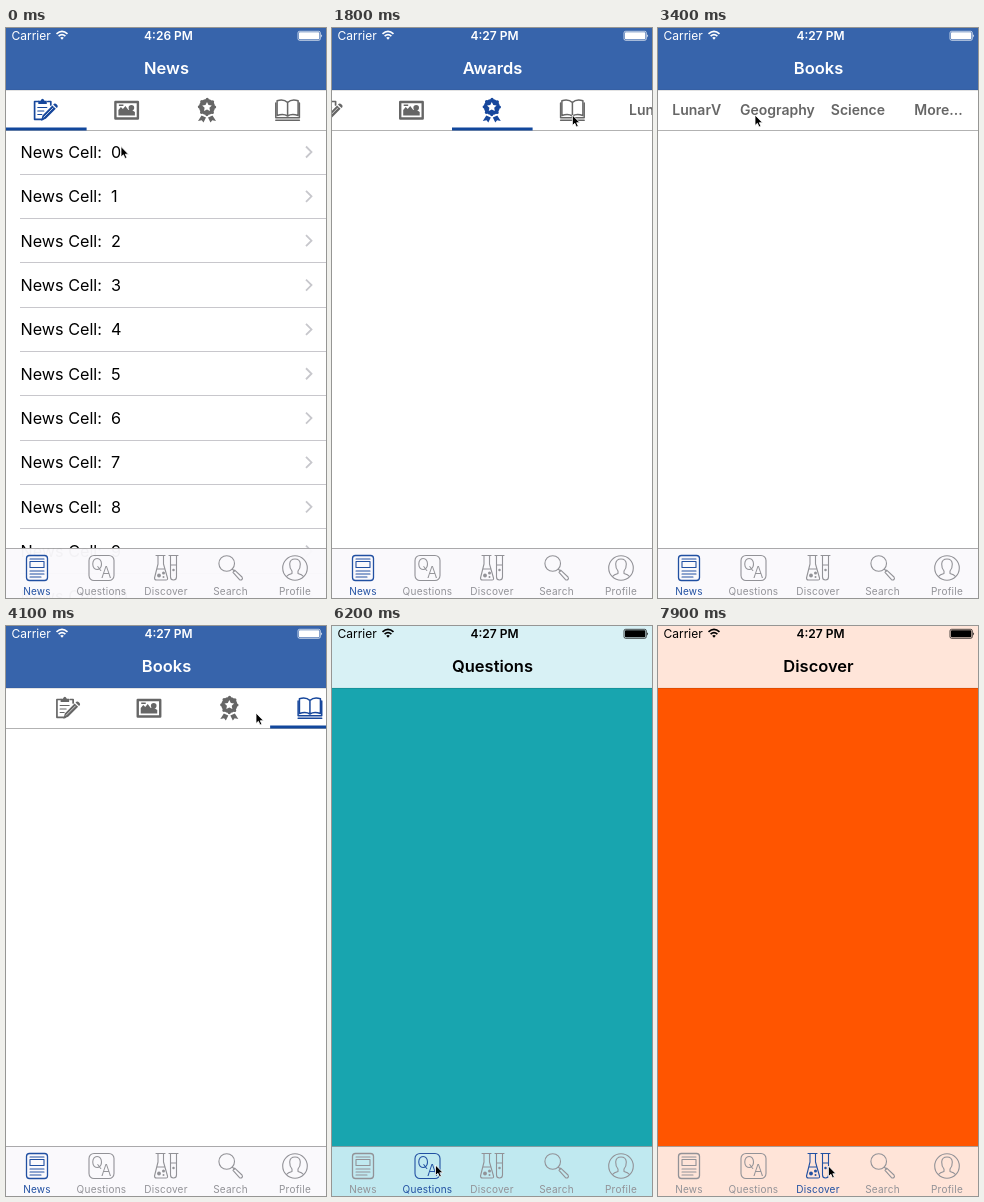
These frames come from a looping animation (320x570 px, 8000 ms). An HTML page:

```html
<!DOCTYPE html>
<html lang="en">
<head>
<meta charset="utf-8">
<title>Tabbed app</title>
<style>
html, body { margin: 0; width: 100%; height: 100%; overflow: hidden; background: #fff; }
svg { display: block; width: 320px; height: 570px; font-family: Inter, Roboto, "Liberation Sans", sans-serif; }
.icon { fill: none; stroke: currentColor; stroke-linejoin: round; stroke-linecap: round; }
.solid { fill: currentColor; stroke: none; }
.mid { text-anchor: middle; }
#strip text { font-size: 14px; font-weight: 600; fill: currentColor; }
#tabs text { font-size: 10px; font-weight: 400; letter-spacing: .25px; fill: currentColor; }
#tabs .icon { stroke-width: 1.1; }
#tabs .letter { font-size: 15.5px; font-weight: 300; letter-spacing: 0; stroke: none; }
</style>
</head>
<body>
<svg viewBox="0 0 320 570">
  <defs>
    <clipPath id="stage"><path d="M0 0H320V570H0Z"/></clipPath>
  </defs>
  <g clip-path="url(#stage)">
    <rect width="320" height="570" fill="#fff"/>
    <g id="pager">
      <g id="news"></g>
      <g id="photos"><rect x="320" y="102" width="320" height="468" fill="#efeff4"/></g>
    </g>
    <g id="strip">
      <rect y="62" width="320" height="40" fill="#fff"/>
      <path d="M0 102.5H320" stroke="#b2b2b2"/>
      <g id="items"><rect id="mark" y="99.5" width="80.6" height="3" fill="#11479c"/></g>
    </g>
    <rect id="fill" y="62" width="320" height="458"/>
    <rect id="nav" width="320" height="62"/>
    <path d="M0 62.25H320" stroke="#000" stroke-opacity=".3" stroke-width=".5"/>
    <g id="status" fill="currentColor">
      <text x="5.5" y="12" font-size="12">Carrier</text>
      <g fill="none" stroke="currentColor" stroke-width="1.7">
        <path d="M50.5 5.8Q56 .9 61.5 5.8M52.6 8.1Q56 5.1 59.4 8.1"/>
        <path d="M56 11.8L54.2 9.8Q56 8.4 57.8 9.8Z" fill="currentColor" stroke="none"/>
      </g>
      <text id="clock" class="mid" x="162.5" y="12" font-size="12" font-weight="600"></text>
      <rect x="292" y="3.3" width="22.3" height="9" rx="1.6" fill="none" stroke="currentColor" stroke-width=".7"/>
      <rect x="293" y="4.3" width="20.3" height="7" rx=".8"/>
      <path d="M315.2 6.2Q317 7.8 315.2 9.4Z"/>
      <text id="title" class="mid" x="160.5" y="45.8" font-size="16.5" font-weight="600"></text>
    </g>
    <g id="tabs">
      <rect id="bar" y="520" width="320" height="50"/>
      <path d="M0 520.5H320" stroke="#000" stroke-opacity=".32"/>
    </g>
    <path id="cursor" d="M0 0V10.5L2.4 8.3 4 12 5.9 11.2 4.3 7.7H7.5Z" stroke="#fff" stroke-width=".8"/>
  </g>
</svg>
<script>
const el = id => document.getElementById(id);
const add = (id, markup) => el(id).insertAdjacentHTML('beforeend', markup);
const STEP = 80.6, STRIP_BLUE = '#17479c', TAB_BLUE = '#2150a2';

const stripIcons = [
  // clipboard with pencil
  `<path stroke-width="1.7" d="M-7 -8.5H-11.2V9.3H-3M2 -8.5H5V-5"/>
   <path class="solid" d="M-7.5 -6V-9.3H-5.3Q-3.3 -13 -1.3 -9.3H1V-6Z"/>
   <path stroke-width="1.2" d="M-8 -2.5H1M-8 1H-2M-8 4.5H-4"/>
   <path class="solid" d="M6.5 -4.5L10 -1.2L0 8.8L-4.8 10.8L-3.3 5.5Z M7.4 -5.5Q9 -7.6 11 -5.6Q13 -3.8 10.9 -2.1Z"/>
   <path stroke="#fff" stroke-width=".7" d="M7.2 -2L-2 7.2"/>`,
  // framed picture
  `<rect x="-11" y="-8" width="22.5" height="16.5" stroke-width="2.4"/>
   <path class="solid" d="M-8 5.5V0L-5.5 -3 -3.5 -1 -1 -4 2 0 4 -1 8.5 2V5.5Z"/>
   <circle class="solid" cx="5" cy="-2.2" r="2.8"/>
   <path class="solid" d="M-7.5 -5.5H-3V-4H-7.5Z"/>`,
  // rosette
  `<circle class="solid" cy="-3" r="8"/>
   <circle cy="-3" r="7.6" stroke-width="3.2" stroke-dasharray="0 5.97"/>
   <path fill="#fff" stroke="none" d="M0 -8L1.5 -5 4.8 -4.6 2.4 -2.2 3 1.1 0 -.5 -3 1.1 -2.4 -2.2 -4.8 -4.6 -1.5 -5Z"/>
   <path class="solid" d="M-5.5 5.5L-1 7.5-3.5 12.5-5.3 10.2-9 11Z M5.5 5.5L1 7.5 3.5 12.5 5.3 10.2 9 11Z"/>`,
  // open book
  `<path stroke-width="1.5" d="M0 6V-7.5Q-4 -11.5 -10.5 -9.3V5.5Q-4 3.5 0 6Q4 3.5 10.5 5.5V-9.3Q4 -11.5 0 -7.5"/>
   <path stroke-width="1.5" d="M-11.8 -7V7.8H11.8V-7M-11.8 10.3H11.8"/>`
];
const topics = ['LunarV', 'Geography', 'Science', 'More...'];

const tabIcons = [
  `<rect x="-10.5" y="-12.5" width="21" height="25" rx="3" stroke-width="1.3"/>
   <path d="M-7 -9H7M-7 3H7M-7 6H7M-7 9H4"/><rect x="-7" y="-6.5" width="14" height="6"/>`,
  `<rect x="-12.5" y="-12.5" width="25" height="25" rx="5"/>
   <text class="letter mid" x="-4.5" y="1.5">Q</text><text class="letter mid" x="4.8" y="9.8">A</text>`,
  `<path d="M-10 -12.5H-1M-8 -12.5V-4L-11.5 10Q-11.5 12 -9.5 12H0Q2 12 1.5 10L-2.5 -4V-12.5M-9 1H-1"/>
   <path d="M3 -12.5H12M4.5 -12.5V9Q4.5 12 7.5 12T10.5 9V-12.5M4.5 -3H10.5"/>
   <circle class="solid" cx="-7" cy="7.5" r="1.9"/><circle class="solid" cx="-2.5" cy="5" r="1.5"/>
   <circle class="solid" cx="-2.5" cy="9" r="1"/><circle cx="7.5" cy="2" r=".7"/>`,
  `<circle cx="-3.8" cy="-4.5" r="7.8"/>
   <path d="M1.7 1L4 3.2M4.2 2.2L11.5 9Q12.5 10.5 11.5 11.5T9 11.7L2.5 4.3Z"/>`,
  `<circle r="12.3"/>
   <path d="M-8.5 8.5Q-7 6.5 -3 5.5V3Q-5.5 0 -5.3 -4Q-5 -9 0 -9T5.3 -4Q5.5 0 3 3V5.5Q7 6.5 8.5 8.5"/>`
];
const tabNames = ['News', 'Questions', 'Discover', 'Search', 'Profile'];

for (let i = 0; i < 11; i++) {
  const y = 124 + 44.35 * i;
  add('news', `<text x="14.5" y="${y + 6}" font-size="16.2" xml:space="preserve">News Cell:  ${i}</text>
    <path d="M14 ${Math.floor(y + 22) + .5}H320" stroke="#c8c7cc"/>
    <path d="M300 ${y - 5.5}l5.5 5.5l-5.5 5.5" fill="none" stroke="#c7c7cc" stroke-width="1.8"/>`);
}
for (let i = 0; i < 6; i++)
  add('photos', `<rect x="${329 + i % 2 * 157}" y="${112 + (i >> 1) * 156.5}" width="146" height="146.5" fill="#fff"/>`);

stripIcons.forEach((icon, i) =>
  add('items', `<g id="item${i}" class="icon" transform="translate(${STEP * (i + .5) - .5} 82)">${icon}</g>`));
topics.forEach((name, i) =>
  add('items', `<text class="mid" color="#666" x="${STEP * (i + 4.5)}" y="87">${name}</text>`));
tabNames.forEach((name, i) => {
  const x = 31 + 64.5 * i;
  add('tabs', `<g id="tab${i}"><g class="icon" transform="translate(${x} 540)">${tabIcons[i]}</g>
    <text class="mid" x="${x}" y="566.5">${name}</text></g>`);
});

// Each key is [time, ...values]; eased between neighbours.
const pageKeys = [[600, 0], [900, 1], [1400, 1], [1700, 2], [2000, 2], [2300, 3]];
const scrollKeys = [[1400, 0], [1700, 41.2], [2000, 41.2], [2300, 121.8], [2600, 121.8],
  [2950, 287], [3300, 324], [3400, 324], [3600, -45], [3900, -45], [4300, 0]];
const cursorKeys = [[150, 115, 118.5], [550, 122, 86], [800, 122, 86], [1100, 181, 88],
  [1300, 200, 87], [1650, 200, 87], [1950, 280, 87], [2200, 280, 87], [2500, 261.5, 87],
  [2600, 261.5, 87], [2950, 97, 87], [3400, 97, 87], [3600, 250, 87], [4450, 250, 87],
  [5300, 115, 527.5], [5500, 103.5, 539], [6800, 103.5, 539], [7250, 170.5, 540]];

function at(keys, t) {
  const n = keys.findIndex(k => k[0] > t);
  if (n < 0) return keys[keys.length - 1].slice(1);
  if (n === 0) return keys[0].slice(1);
  const a = keys[n - 1], b = keys[n], u = (t - a[0]) / (b[0] - a[0]);
  const e = u * u * (3 - 2 * u);
  return a.slice(1).map((v, i) => v + (b[i + 1] - v) * e);
}

const count = (times, t) => times.filter(x => t >= x).length;
const set = (id, name, value) => el(id).setAttribute(name, value);
const move = (id, x, y = 0) => set(id, 'transform', `translate(${x} ${y})`);

const themes = [
  { nav: '#3764ab', bar: 'rgba(250,249,252,.97)', ink: '#fff', fill: 'none' },
  { nav: '#d8f1f5', bar: '#c0e9f0', ink: '#000', fill: '#18a5af' },
  { nav: '#ffe5d9', bar: '#ffe4d8', ink: '#000', fill: '#ff5500' }
];

function draw() {
  const t = performance.now() % 8000;
  const tab = count([5600, 7400], t), page = count([600, 1400, 2000], t);
  const theme = themes[tab];
  const [pos] = at(pageKeys, t), [scroll] = at(scrollKeys, t);

  move('pager', -320 * pos);
  move('items', -scroll);
  move('mark', STEP * pos);
  move('cursor', ...at(cursorKeys, t));
  for (let i = 0; i < 4; i++) set('item' + i, 'color', i === page ? STRIP_BLUE : '#666');
  for (let i = 0; i < 5; i++) set('tab' + i, 'color', i === tab ? TAB_BLUE : '#929297');

  set('nav', 'fill', theme.nav);
  set('bar', 'fill', theme.bar);
  set('fill', 'fill', theme.fill);
  set('status', 'color', theme.ink);
  el('title').textContent = tab ? tabNames[tab] : ['News', 'PhotoViews', 'Awards', 'Books'][page];
  el('clock').textContent = t < 1800 ? '4:26 PM' : '4:27 PM';
  requestAnimationFrame(draw);
}
draw();
</script>
</body>
</html>
```
